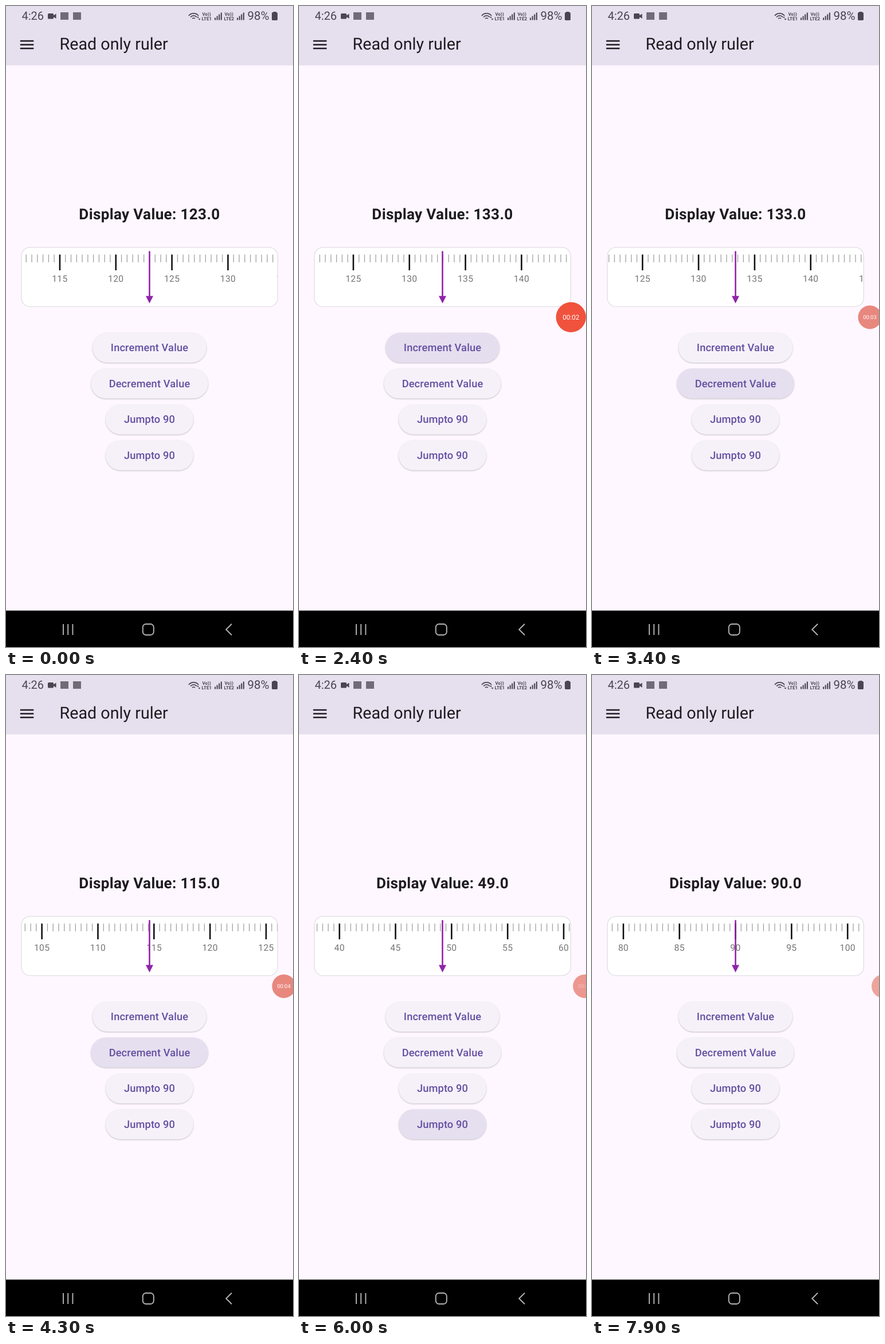
Write an HTML page that moves like this. It is 501 px wide and 1118 px high and loops after 8 s.

```html
<!DOCTYPE html>
<html lang="en">
<head>
<meta charset="utf-8">
<title>Read only ruler</title>
<style>
  html, body { margin: 0; width: 100%; height: 100%; overflow: hidden; background: #fef7ff; }
  svg { display: block; width: 501px; height: 1118px; font-family: Roboto, "Noto Sans", sans-serif; text-rendering: geometricPrecision; }
  .mid { text-anchor: middle; }
  .status { fill: #4a4551; font-size: 20px; }
  .tiny { font-size: 8px; font-weight: 700; }
  .title { fill: #1d1b20; font-size: 28.7px; }
  .value { fill: #1d1b20; font-size: 26.1px; font-weight: 700; letter-spacing: .326px; }
  .label { fill: #757575; font-size: 15.66px; letter-spacing: .326px; }
  .face { fill: #f6f1f9; filter: drop-shadow(0 1.4px 1.3px rgba(0, 0, 0, .24)); }
  .caption { fill: #654fa2; font-size: 18.27px; font-weight: 500; letter-spacing: .13px; }
  .line { fill: none; stroke: #b4b4b4; stroke-width: 1.9; }
</style>
</head>
<body>
<svg viewBox="0 0 501 1118">
  <defs>
    <clipPath id="cardClip"><rect x="27.4" y="421.8" width="446.2" height="101.8" rx="14.5"/></clipPath>
    <radialGradient id="ink">
      <stop offset="0" stop-color="#6750a4"/>
      <stop offset=".55" stop-color="#6750a4"/>
      <stop offset="1" stop-color="#6750a4" stop-opacity="0"/>
    </radialGradient>
  </defs>
  <rect width="501" height="1118" fill="#fef7ff"/>
  <rect width="501" height="103.5" fill="#e6dfee"/>

  <g class="status">
    <text x="27.5" y="24">4:26</text>
    <text x="421.5" y="24" font-size="20.5">98%</text>
    <rect x="73" y="13" width="10" height="9.5" rx="1.5"/>
    <path d="M83 16.5l4.5-3v8.5l-4.5-3z"/>
    <rect x="95" y="11" width="14" height="13" opacity=".75"/>
    <rect x="117" y="11" width="14" height="13" opacity=".75"/>
    <g id="wifi" fill="none" stroke="#4a4551" stroke-width="1.7"></g>
    <path d="M333 20.5l2-2.5 2 2.5zM335.5 22h4l-2 2.7z"/>
    <g class="tiny">
      <text x="342.5" y="16.5">Vo))</text><text x="341.5" y="25">LTE1</text>
      <text x="381.5" y="16.5">Vo))</text><text x="380.5" y="25">LTE2</text>
    </g>
    <path id="signal"/>
    <path d="M466.5 10h5v1.5h-5z"/>
    <rect x="464" y="11" width="10" height="14" rx="1.8"/>
  </g>

  <path d="M24.8 61h23.5M24.8 67.5h23.5M24.8 74h23.5" stroke="#1d1b20" stroke-width="2.6"/>
  <text class="title" x="93.5" y="75.8">Read only ruler</text>
  <text class="value mid" id="value" x="250.5" y="371.5"></text>

  <rect x="26.8" y="421.1" width="447.5" height="103.2" rx="15" fill="#fff" stroke="#e0dee3" stroke-width="1.3"/>
  <g clip-path="url(#cardClip)"><g id="scale"></g></g>
  <path d="M250.5 427.5V507" stroke="#9024a9" stroke-width="2.6"/>
  <path d="M244 505.8h13l-6.5 13z" fill="#9024a9"/>

  <g id="buttons"></g>

  <g id="bubble">
    <circle id="disc" cy="542.8"/>
    <text id="clock" class="mid" fill="#fff"></text>
  </g>

  <rect y="1054.5" width="501" height="63.5"/>
  <path class="line" d="M100 1078v19M108.2 1078v19M116.4 1078v19"/>
  <rect class="line" x="238.8" y="1078" width="19" height="19" rx="5.5"/>
  <path class="line" d="M394 1077.8l-9.8 9.7 9.8 9.7"/>
</svg>
<script>
const LOOP = 8000, MID = 250.5, UNIT = 19.57, MOVE = 350, DELAY = 55;
const START = 123;

// [tap time, button index, ruler value to reach]
const TAPS = [
  [2055, 0, 133], [2555, 0, 143],
  [3104, 1, 133], [3595, 1, 123], [4086, 1, 113],
  [4795, 2, 90], [5795, 3, 40], [6795, 2, 90]
];
const BUTTONS = [
  ["Increment Value", 199], ["Decrement Value", 204.5],
  ["Jumpto 90", 153], ["Jumpto 90", 153]
];
// [time, centre x, radius, font size, text opacity, red, green, blue]
const BUBBLE = [
  [3000, 474.8, 26.2, 11.7, 1, 240, 82, 61],
  [3300, 485, 20.6, 9.4, 1, 232, 135, 126],
  [5790, 485, 20.6, 9.4, 1, 232, 135, 126],
  [6150, 508.6, 20.6, 9.4, 0, 238, 163, 155]
];

const $ = id => document.getElementById(id);
const clamp = p => Math.max(0, Math.min(1, p));
const easeOut = p => 1 - (1 - p) ** 3;

function add(parent, tag, attrs, text) {
  const el = document.createElementNS("http://www.w3.org/2000/svg", tag);
  set(el, attrs);
  if (text !== undefined) el.textContent = text;
  return parent.appendChild(el);
}
function set(el, attrs) {
  for (const k in attrs) el.setAttribute(k, attrs[k]);
}

function buildStatus() {
  for (const r of [3, 7, 11]) {
    const dx = r * .78, y = 24 - r * .63;
    add($("wifi"), "path", { d: `M${327.5 - dx} ${y}A${r} ${r} 0 0 1 ${327.5 + dx} ${y}` });
  }
  let d = "";
  for (const x of [364, 403])
    for (let i = 0; i < 4; i++) d += `M${x + i * 3.6} 24.5v${-4 - i * 3}h2.1V24.5z`;
  set($("signal"), { d });
}

function buildScale() {
  let minor = "", major = "";
  for (let n = 40; n <= 330; n++) {
    const x = n / 2 * UNIT;
    if (n % 10) minor += `M${x} 433.5V447`;
    else {
      major += `M${x} 433.5V461`;
      add($("scale"), "text", { class: "label mid", x, y: 481 }, n / 2);
    }
  }
  add($("scale"), "path", { d: minor, stroke: "#a0a0a0", "stroke-width": 1.3 });
  add($("scale"), "path", { d: major, stroke: "#111", "stroke-width": 2.6 });
}

function buildButton([text, width], i) {
  const cy = 595.8 + i * 62.63;
  const box = { x: MID - width / 2, y: cy - 26.1, width, height: 52.2, rx: 26.1 };
  const g = add($("buttons"), "g", {});
  add(g, "rect", { ...box, class: "face" });
  const clip = add(add(g, "clipPath", { id: "clip" + i }), "rect", box);
  const press = add(g, "g", { "clip-path": `url(#clip${i})` });
  add(press, "rect", { ...box, fill: "#6750a4", opacity: .045 });
  const ripple = add(press, "circle", { cx: 285, cy, fill: "url(#ink)", opacity: .07 });
  add(g, "text", { class: "caption mid", x: MID, y: cy + 6.3 }, text);
  return { press, ripple };
}

function rulerValue(t) {
  let v = START;
  for (const [at, , goal] of TAPS) v += (goal - v) * easeOut(clamp((t - at - DELAY) / MOVE));
  return v;
}

function drawButtons(t) {
  buttons.forEach(({ press, ripple }, i) => {
    const tap = TAPS.filter(([at, b]) => b === i && at <= t).pop();
    const age = tap ? t - tap[0] : LOOP;
    set(press, { opacity: 1 - clamp((age - 345) / 60) });
    set(ripple, { r: 23 + 380 * clamp(age / 250) });
  });
}

function drawBubble(t) {
  let i = 0;
  while (i < BUBBLE.length - 2 && t >= BUBBLE[i + 1][0]) i++;
  const a = BUBBLE[i], b = BUBBLE[i + 1];
  const p = clamp((t - a[0]) / (b[0] - a[0]));
  const [, x, r, size, alpha, ...rgb] = a.map((v, k) => v + (b[k] - v) * p);
  set($("bubble"), { visibility: t < 200 ? "hidden" : "visible" });
  set($("disc"), { cx: x, r, fill: `rgb(${rgb.map(Math.round)})` });
  set($("clock"), { x, y: 542.8 + size * .36, "font-size": size, opacity: alpha });
  $("clock").textContent = "00:0" + Math.max(0, Math.floor((t - 100) / 1000));
}

function draw(t) {
  const v = rulerValue(t);
  $("value").textContent = `Display Value: ${Math.round(v).toFixed(1)}`;
  set($("scale"), { transform: `translate(${MID - v * UNIT} 0)` });
  drawButtons(t);
  drawBubble(t);
}

buildStatus();
buildScale();
const buttons = BUTTONS.map(buildButton);
const begin = performance.now();
function tick() {
  draw((performance.now() - begin) % LOOP);
  requestAnimationFrame(tick);
}
tick();
</script>
</body>
</html>
```
